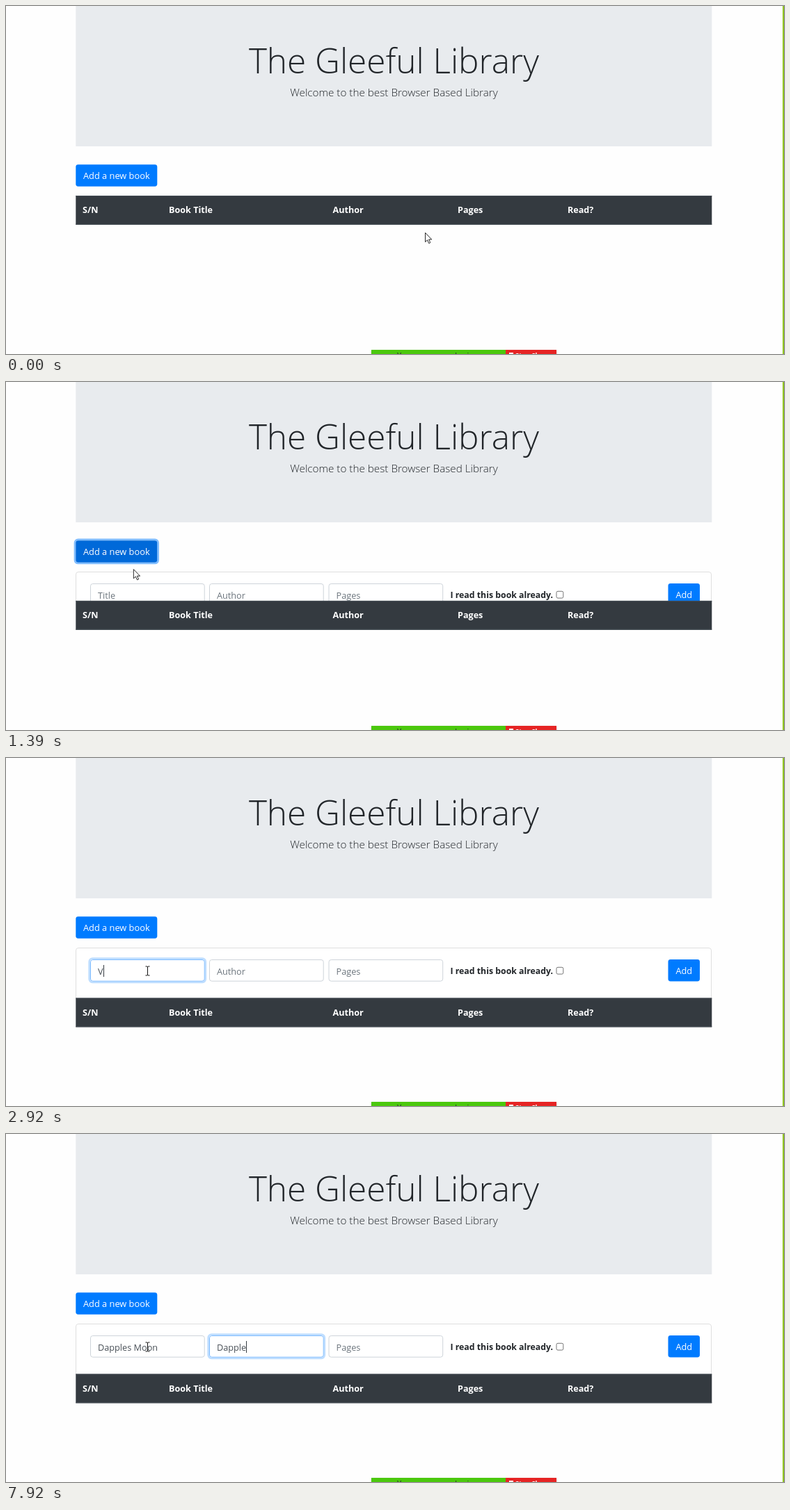
Animation, 1118 px wide and 501 px high, one loop 8000 ms. Source, as an HTML page:

```html
<!DOCTYPE html>
<html lang="en">
<head>
<meta charset="utf-8">
<title>Library</title>
<style>
  html, body { margin: 0; width: 100%; height: 100%; overflow: hidden; background: #fefefe; }
  svg { display: block; width: 1118px; height: 501px; }
  text { font: 12.7px "Open Sans", "Noto Sans", sans-serif; fill: #212529; white-space: pre; }
  .light { font-weight: 300; }
  .white { fill: #fff; }
  .bold { font-weight: 700; }
  .hint { fill: #6c757d; }
  .typed { fill: #495057; }
  .item { font-size: 10.4px; fill: #111; }
</style>
</head>
<body>
<svg viewBox="0 0 1118 501">
  <defs>
    <clipPath id="fold"><rect id="foldRect" x="96" y="272" width="922" height="0"/></clipPath>
    <filter id="shadow" x="-10%" y="-10%" width="120%" height="130%">
      <feDropShadow dx="0" dy="1" stdDeviation="1.3" flood-opacity=".28"/>
    </filter>
  </defs>
  <rect width="1118" height="501" fill="#fefefe"/>
  <rect x="100.3" width="914" height="202" fill="#e8ebee"/>
  <text class="light" x="557.5" y="97" text-anchor="middle" style="font-size:49.5px">The Gleeful Library</text>
  <text class="light" x="557.5" y="130" text-anchor="middle" style="font-size:15.25px">Welcome to the best Browser Based Library</text>

  <rect id="ring" x="99" y="226.9" width="119.6" height="34.1" rx="4.5" fill="none" stroke="#80bdff" stroke-width="2.7"/>
  <rect id="button" x="100.3" y="228.2" width="117" height="31.5" rx="3.4"/>
  <text class="white" x="158.8" y="248.6" text-anchor="middle" style="font-size:12.8px">Add a new book</text>

  <g clip-path="url(#fold)">
    <rect x="100.5" y="273.5" width="913" height="90" rx="3.5" fill="#fff" stroke="#dfdfdf"/>
    <g id="fields"></g>
    <text class="bold" x="638.5" y="311" style="font-size:12.3px">I read this book already.</text>
    <rect x="791" y="301.3" width="9.8" height="9.8" rx="2" fill="#fff" stroke="#767676"/>
    <rect x="951.5" y="290" width="45.5" height="31.5" rx="3.4" fill="#007bff"/>
    <text class="white" x="974.2" y="310.8" text-anchor="middle">Add</text>
  </g>

  <g id="table">
    <rect x="100.3" width="914" height="42" fill="#343a40"/>
    <path d="M100.3 .5h914M100.3 41.2h914" stroke="#454d55"/>
  </g>
  <g id="menu"></g>

  <rect x="1116" width="2" height="501" fill="#92c622"/>
  <g>
    <rect x="525" y="495" width="266" height="8" fill="#4bc80a" filter="url(#shadow)"/>
    <rect x="718" y="495" width="73" height="6" fill="#e62424"/>
    <text x="620" y="507" text-anchor="middle" style="font-size:11px">You are screen sharing</text>
    <rect x="723" y="499" width="6" height="2" fill="#fff"/>
    <text class="white bold" x="732" y="506" style="font-size:9.4px">Stop Share</text>
  </g>

  <g id="arrow"><path d="M.5.5v13.2l3-2.8 2.2 4.8 2.1-1-2.2-4.6h4.1z" fill="#fff" stroke="#111" stroke-width=".9"/></g>
  <g id="hand"><path d="M-1.6 1Q0-1 1.6 1V5.5Q3 4.6 4 6 5.4 5.2 6.3 6.6 8.2 6 8.4 8.2V11.5Q8 14 6.8 15.5V17.5H-.8V15.8L-5 10.5Q-5.6 8.3-3.5 8.7L-1.6 10.5Z" fill="#fff" stroke="#111" stroke-width="1"/></g>
  <g id="beam"><path d="M-3-6.5H-1Q0-6.5 0-5.5 0-6.5 1-6.5H3M-3 6.5H-1Q0 6.5 0 5.5 0 6.5 1 6.5H3M0-5.5V5.5" fill="none" stroke="#111"/></g>
</svg>
<script>
const LOOP = 8000;
const $ = id => document.getElementById(id);
const clamp = x => Math.max(0, Math.min(1, x));
const span = (t, from, to) => clamp((t - from) / (to - from));
const mix = (a, b, k) => a + (b - a) * k;
const smooth = k => k * k * (3 - 2 * k);

function add(parent, tag, attrs, text = '') {
  const el = document.createElementNS('http://www.w3.org/2000/svg', tag);
  set(el, attrs);
  el.textContent = text;
  return parent.appendChild(el);
}
function set(el, attrs) { for (const name in attrs) el.setAttribute(name, attrs[name]); }
function show(el, on) { el.style.display = on ? '' : 'none'; }

// Latest entry of [time, value] pairs whose time has come.
const latest = (track, t, first) => track.reduce((value, [at, next]) => t >= at ? next : value, first);

// One entry per keystroke, each adding a letter to `before`.
const typing = (word, times, before = '') =>
  times.map((at, i) => [at, before + word.slice(0, i + 1)]);

const titleTrack = [
  [2920, 'V'], [3170, 'Ve'], [3480, 'V'], [3700, ''],
  ...typing('Dapples', [4180, 4320, 4460, 4600, 4720, 4800, 5030]),
  ...typing(' Moon', [5260, 5660, 5820, 5970, 6120], 'Dapples')
];
const authorTrack = typing('Dapple', [7100, 7300, 7450, 7600, 7760, 7920]);

const history = ['Dapple', 'Dusky Fern', 'Slow Lanterns', 'Tin Rain', 'A Paper Orchard', 'Quill and Ember', 'Nine Kettles'];
const titleMenu = [[2690, history], [2920, []], [4180, history.slice(0, 2)], [4320, ['Dapple']], [5030, []]];
const authorMenu = [[7100, ['Daven Orrick']], [7450, []]];

['S/N', 'Book Title', 'Author', 'Pages', 'Read?'].forEach((label, i) =>
  add($('table'), 'text', { class: 'bold white', x: [110, 234, 469.5, 649, 807][i], y: 25.3, style: 'font-size:12.6px' }, label));

function makeField(label, x) {
  const g = add($('fields'), 'g', {});
  const ring = add(g, 'rect', { x: x - 1.3, y: 288.7, width: 167.1, height: 34.1, rx: 4.5, fill: 'none', stroke: '#bfdeff', 'stroke-width': 2.7 });
  const box = add(g, 'rect', { x: x + .5, y: 290.5, width: 163.7, height: 30.7, rx: 3.2, fill: '#fff' });
  const text = add(g, 'text', { x: x + 11, y: 311.5 });
  const caret = add(g, 'rect', { y: 298, width: 1, height: 17, fill: '#343a40' });
  return (value, focus, caretOn) => {
    ring.setAttribute('opacity', focus);
    box.setAttribute('stroke', focus > .5 ? '#80bdff' : '#ced4da');
    text.textContent = value || label;
    text.setAttribute('class', value ? 'typed' : 'hint');
    caret.setAttribute('x', Math.round(x + 11 + (value ? text.getComputedTextLength() : 0)));
    show(caret, caretOn);
  };
}
const drawTitle = makeField('Title', 121);
const drawAuthor = makeField('Author', 292);
makeField('Pages', 463.5)('', 0, false);

function drawMenu(items, x) {
  const menu = $('menu');
  menu.replaceChildren();
  if (!items.length) return;
  add(menu, 'rect', { x, y: 323.5, width: 164.7, height: 13.5 + 28 * items.length, fill: '#fff', filter: 'url(#shadow)' });
  items.forEach((item, i) => add(menu, 'text', { class: 'item', x: x + 10, y: 347.8 + 28 * i }, item));
}

function pointer(t) {
  if (t < 1320) {
    const k = smooth(span(t, 0, 1090)), j = 1 - k;
    const x = 602 * j * j + 2 * 420 * j * k + 172 * k * k;
    const y = 326 * j * j + 2 * 2 * j * k + 243 * k * k;
    return [x, y];
  }
  const down = span(t, 1320, 1530), settle = smooth(span(t, 1600, 2140));
  return [mix(mix(172, 204.5, down), 203.5, settle), mix(mix(243, 321.5, down), 306.5, settle)];
}

function draw(t) {
  const tick = t < 70 ? 0 : t > 2140 ? t : Math.floor((t - 60) / 70) * 70 + 60;

  const fold = 72.5 * (1 - (1 - span(tick, 1310, 1630)) ** 3);
  $('foldRect').setAttribute('height', fold + 1);
  $('table').setAttribute('transform', `translate(0 ${273 + fold})`);

  const [x, y] = pointer(tick);
  const overButton = x > 100 && x < 217 && y > 228 && y < 260;
  const overField = fold > 40 && y > 288;
  const shape = overButton ? 'hand' : overField ? 'beam' : 'arrow';
  for (const id of ['arrow', 'hand', 'beam']) show($(id), id === shape);
  $(shape).setAttribute('transform', `translate(${x} ${y})`);

  const pressed = span(t, 1100, 1250) * (1 - span(t, 2200, 2310));
  set($('ring'), { opacity: pressed });
  set($('button'), { fill: overButton || pressed > .5 ? '#0069d9' : '#007bff' });

  const leave = span(t, 6300, 6500);
  const inTitle = t >= 2240 && t < 6350, inAuthor = t >= 6350;
  drawTitle(latest(titleTrack, t, ''), span(t, 2180, 2310) * (1 - leave), inTitle);
  drawAuthor(latest(authorTrack, t, ''), leave, inAuthor && !(t >= 6900 && t < 7100));
  if (inAuthor) drawMenu(latest(authorMenu, t, []), 292);
  else drawMenu(latest(titleMenu, t, []), 121);
}

const start = performance.now();
function frame() {
  draw((performance.now() - start) % LOOP);
  requestAnimationFrame(frame);
}
draw(0);
requestAnimationFrame(frame);
</script>
</body>
</html>
```
